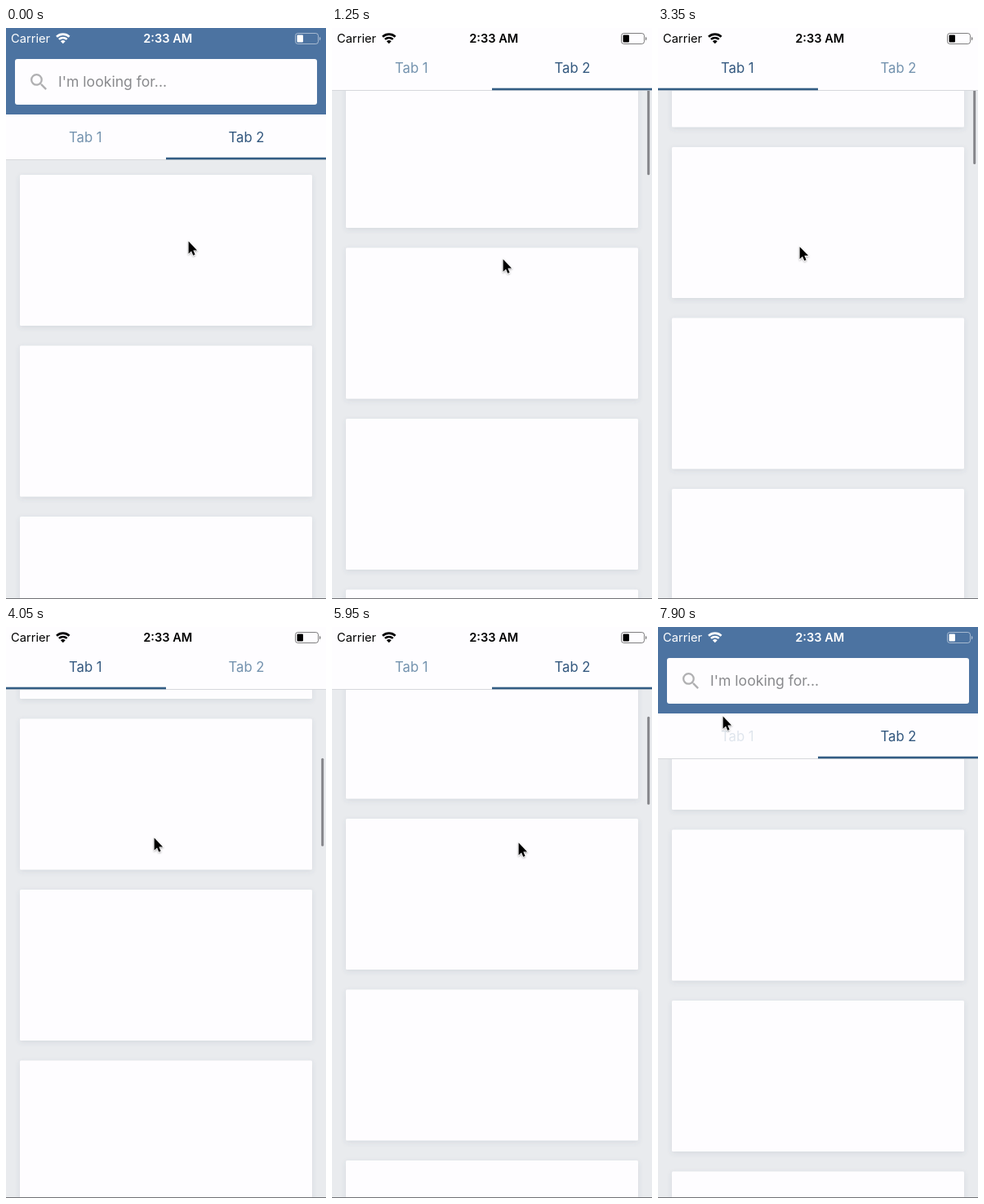
Recreate the animation shown at these times as an HTML page. Size 392 px wide and 700 px high, loop 8000 ms.

```html
<!DOCTYPE html>
<html lang="en">
<head>
<meta charset="utf-8">
<title>Collapsing header with tabs</title>
<style>
  html, body { margin: 0; width: 100%; height: 100%; overflow: hidden; background: #e9ebee; }
  svg { display: block; width: 392px; height: 700px; font-family: Inter, Roboto, sans-serif; }
</style>
</head>
<body>
<svg viewBox="0 0 392 700" xmlns="http://www.w3.org/2000/svg">
  <defs>
    <filter id="soft" x="-5%" y="-5%" width="110%" height="115%">
      <feDropShadow dx="0" dy="2" stdDeviation="3" flood-color="#4a5a70" flood-opacity=".12"/>
    </filter>
    <filter id="drop" x="-50%" y="-50%" width="200%" height="200%">
      <feDropShadow dx="0" dy="1.2" stdDeviation="1" flood-color="#000" flood-opacity=".35"/>
    </filter>
  </defs>
  <rect width="392" height="700" fill="#e9ebee"/>
  <g id="page1" fill="#fefdff"></g>
  <g id="page2" fill="#fefdff"></g>
  <rect id="bar" x="386.2" width="3" height="108" rx="1.5" fill="#85868a"/>

  <g id="head">
    <rect y="-10" width="392" height="171.5" fill="#fefdff"/>
    <rect id="blue" y="-10" width="392" height="116" fill="#4c73a1"/>
    <rect x="11" y="38" width="370" height="56" rx="3" fill="#fefdff"/>
    <path transform="translate(26.6 52.6) scale(1.14)" fill="#b0b0b2" d="M15.5 14h-.79l-.28-.27A6.47 6.47 0 0 0 16 9.5 6.5 6.5 0 1 0 9.5 16c1.61 0 3.09-.59 4.23-1.57l.27.28v.79l5 4.99L20.49 19zm-6 0a4.5 4.5 0 1 1 0-9 4.5 4.5 0 0 1 0 9z"/>
    <text x="64" y="72" font-size="17.6" fill="#88898c">I'm looking for...</text>
    <rect y="161" width="392" height="1" fill="#d6d8dc"/>
    <g font-size="16.7" text-anchor="middle">
      <text id="tab1" x="97.3" y="139.7">Tab 1</text>
      <text id="tab2" x="294.5" y="139.7">Tab 2</text>
    </g>
    <rect id="line" y="158.7" width="196" height="2.6" fill="#335d84"/>
  </g>

  <g id="status">
    <text x="6" y="18" font-size="14.7">Carrier</text>
    <text x="198.3" y="18" font-size="14.6" font-weight="600" text-anchor="middle">2:33 AM</text>
    <g fill="none" stroke="currentColor" stroke-width="2.6">
      <path d="M62 10.7a11.4 11.4 0 0 1 15.6 0"/>
      <path d="M64.9 13.9a7.1 7.1 0 0 1 9.8 0"/>
    </g>
    <path d="M69.8 19.2l-2.9-3a4.3 4.3 0 0 1 5.8 0z"/>
    <rect x="354.5" y="6.5" width="28" height="13" rx="3" fill="none" stroke="currentColor" stroke-opacity=".5"/>
    <path d="M384 10.8a2.6 2.6 0 0 1 0 4.6z" opacity=".6"/>
    <rect x="356.5" y="8.5" width="7.5" height="9" rx="1"/>
  </g>

  <rect y="699" width="392" height="1" fill="#707175"/>
  <g id="cursor">
    <path transform="translate(.6 .6) scale(.93)" filter="url(#drop)" stroke="#fff" stroke-width="1.3" paint-order="stroke" d="M0 0V16.2L3.7 12.7 6.1 18.4 8.6 17.3 6.2 11.7H11.3z"/>
  </g>
</svg>
<script>
const LOOP = 8000, STEP = 50, WIDTH = 392, PITCH = 209.5, TOP = 180, FOLD = 85;
const $ = id => document.getElementById(id);
const set = (id, attrs) => { for (const k in attrs) $(id).setAttribute(k, attrs[k]); };
const clamp = (v, a, b) => Math.min(b, Math.max(a, v));
const mix = (a, b, k) => a + (b - a) * k;

const linear = u => u;
const smooth = u => u * u * (3 - 2 * u);
const coast = u => 1 - (1 - u) ** 2.5;
const swing = u => u < .5 ? 4 * u ** 3 : 1 - 4 * (1 - u) ** 3;
const ramp = (t, a, b, ease = linear) => ease(clamp((t - a) / (b - a), 0, 1));

// A flick follows the pointer for `pull` px, then coasts to `total` px.
const flick = (start, release, end, pull, total) => ({ start, release, end, pull, total });
const hide = flick(750, 1000, 1500, 150, 368);
const browse = flick(3200, 3360, 4050, 169, 820.5);
const down = flick(5550, 5700, 6200, 163, 558.5);
const back = flick(6250, 6550, 6950, -126, -293);
const flicks = [hide, browse, down, back];

const pulled = (t, f) => f.pull * ramp(t, f.start, f.release);
const travel = (t, f) => pulled(t, f) + (f.total - f.pull) * ramp(t, f.release, f.end, coast);

const TAP_1 = 2330, TAP_2 = 4940, TAP_1_AGAIN = 7800;
const dim = (t, tap) => .78 * (ramp(t, tap, tap + 100) - ramp(t, tap + 150, tap + 350));
const slide = (t, tap) => ramp(t, tap + 120, tap + 470, swing);

function barOpacity(t) {
  return Math.max(...flicks.map(f =>
    ramp(t, f.start, f.start + 50) - ramp(t, f.end + 200, f.end + 450)));
}

function pointerAt(t) {
  let x = 223, y = 261;
  const go = (a, b, toX, toY) => {
    const k = ramp(t, a, b, smooth);
    x = mix(x, toX, k);
    y = mix(y, toY, k);
  };
  const drag = f => { y -= pulled(t, f); };

  go(50, 750, 209, 433);
  drag(hide);
  go(1700, 2300, 98, 45);
  go(2700, 3150, 173, 426);
  drag(browse);
  go(3360, 3450, 181, 258);
  go(4250, 4800, 290, 44);
  go(5100, 5450, 234, 427);
  drag(down);
  go(5700, 5800, 228, 264);
  drag(back);
  go(6750, 7450, 181, 205);
  go(7450, 7850, 79, 109);
  return [x, y];
}

for (const id of ["page1", "page2"])
  $(id).innerHTML = '<rect x="17" width="358" height="185" rx="1.5" filter="url(#soft)"/>'.repeat(5);

// Only the cards near the stage are kept, so five are enough.
function placePage(id, x, scroll) {
  const first = Math.max(0, Math.floor((scroll - TOP) / PITCH));
  set(id, { transform: `translate(${x} 0)` });
  [...$(id).children].forEach((card, k) =>
    card.setAttribute("y", TOP - scroll + (first + k) * PITCH));
}

function tabColor(k) {
  return `rgb(${mix(115, 50, k)}, ${mix(146, 87, k)}, ${mix(174, 126, k)})`;
}

function draw(t) {
  const page = 1 - slide(t, TAP_1) + slide(t, TAP_2);
  const scroll1 = FOLD + travel(t, browse);
  // The hidden page rewinds to the folded header.
  const scroll2 = t < 2900 ? travel(t, hide) : FOLD + travel(t, down) + travel(t, back);
  const fold = Math.min(FOLD, travel(t, hide)) - Math.min(FOLD, -travel(t, back));

  placePage("page1", -WIDTH * page, scroll1);
  placePage("page2", WIDTH * (1 - page), scroll2);
  set("bar", { y: 21.4 + .154 * (page < .5 ? scroll1 : scroll2), opacity: barOpacity(t) });

  const ink = fold > 60 ? "#000" : "#fff";
  set("head", { transform: `translate(0 ${-fold})` });
  set("blue", { opacity: 1 - ramp(fold, 40, FOLD) });
  set("status", { fill: ink, color: ink });

  set("line", { x: WIDTH / 2 * page });
  set("tab1", { fill: tabColor(1 - page), opacity: 1 - dim(t, TAP_1) - dim(t, TAP_1_AGAIN) });
  set("tab2", { fill: tabColor(page), opacity: 1 - dim(t, TAP_2) });
  set("cursor", { transform: `translate(${pointerAt(t)})` });
}

const start = performance.now();
function tick() {
  // The loop advances in 50 ms steps; the last one is held.
  const t = (performance.now() - start) % LOOP;
  draw(Math.min(Math.floor(t / STEP) * STEP, LOOP - 2 * STEP));
  requestAnimationFrame(tick);
}
tick();
</script>
</body>
</html>
```
